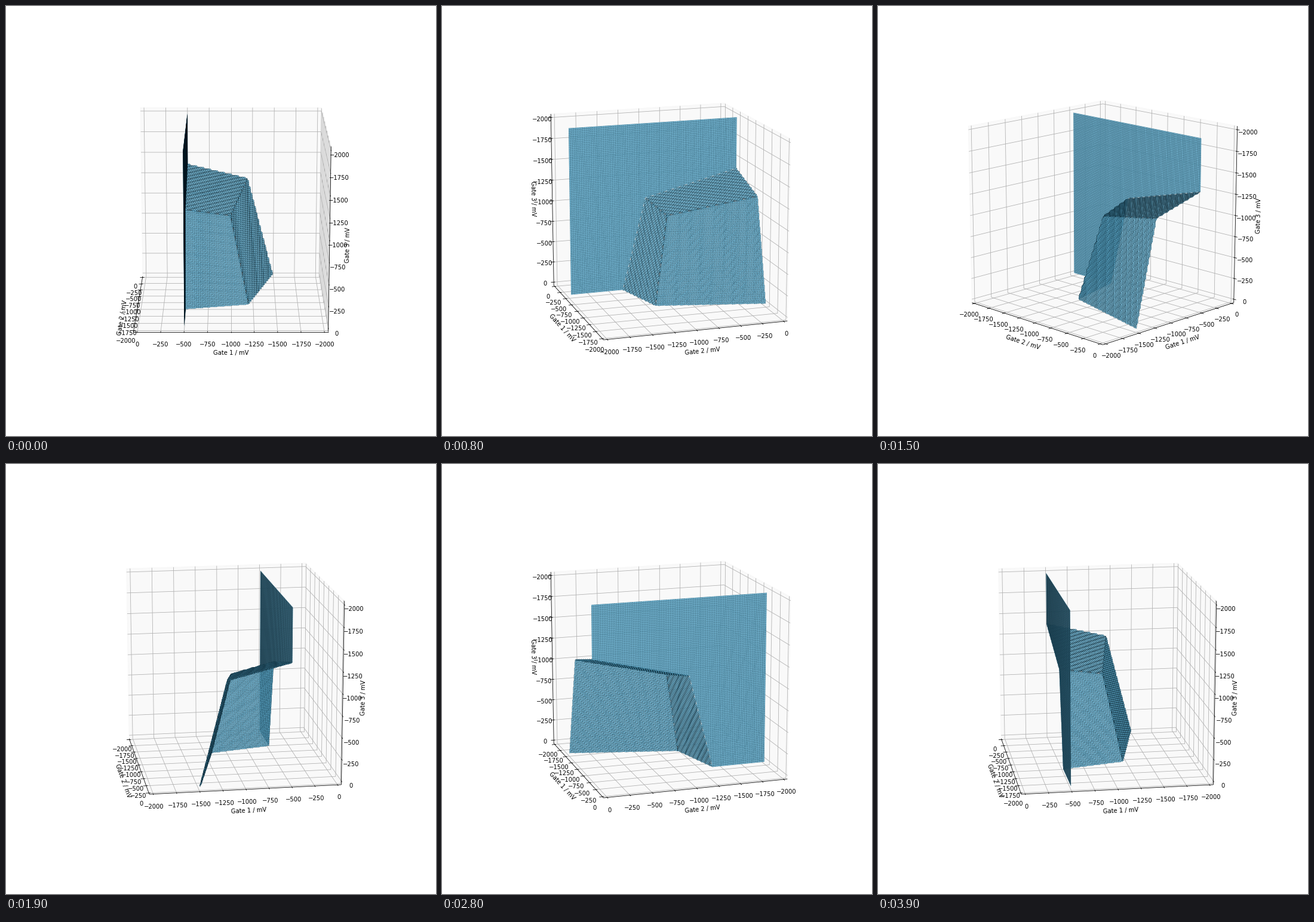
A matplotlib script that plays this animation: 720x720 px, repeating every 4000 ms.

```python
import numpy as np
import matplotlib.pyplot as plt
from matplotlib.animation import FuncAnimation
from matplotlib.collections import LineCollection, PolyCollection
from matplotlib.patches import Polygon

FRAMES = 40
CELLS = 100
LO, HI = -1 / 48, 1 + 1 / 48          # box edges just outside the data range
CE, SE = np.cos(np.radians(15)), np.sin(np.radians(15))
CENTRE = np.array([376.5, 350.9])
SCALE = np.array([3016.2, -2938.4])
DIST = 10

TICKS = np.linspace(0, 1, 9)
TICK_PAD, LABEL_PAD = 0.0418, 0.0908
FLIP = (1, 0, 0)                      # axis moved to the front for each box edge
NAMES = ("Gate 2 / mV", "Gate 1 / mV", "Gate 3 / mV")

LIMIT = 0.747                         # block faces: h + (p + q) / 4 = LIMIT
WALL = 0.25
FACE = (0.40, 0.72, 0.86, 0.85)
EDGE = "#00141e"


def project(points, az):
    """Perspective view of unit-cube points: pixel positions and depth."""
    x, y, z = np.moveaxis(np.asarray(points, float) - 0.5, -1, 0)
    c, s = np.cos(az), np.sin(az)
    near, side = x * c + y * s, y * c - x * s
    depth = DIST - near * CE - z * SE
    flat = np.stack([side / depth, (z * CE - near * SE) / depth], axis=-1)
    return CENTRE + SCALE * flat, depth


def stepped_face(h, p, q, p_start):
    """Terraced face with height along axis h over the axes p and q."""
    p_raw, q_raw = np.meshgrid(np.arange(p_start, 0.7, 1 / CELLS),
                               np.arange(0, 0.7, 1 / CELLS), indexing="ij")
    top = 4 * LIMIT
    p_in = np.minimum(p_raw, (top - q_raw) / 5)
    q_in = np.minimum(q_raw, (top - p_in) / 5)
    pts = np.empty(p_in.shape + (3,))
    pts[..., p], pts[..., q] = p_in, q_in
    pts[..., h] = (np.floor(CELLS * (LIMIT - (p_in + q_in) / 4)) + 0.5) / CELLS
    a, b, c, d = pts[:-1, :-1], pts[1:, :-1], pts[1:, 1:], pts[:-1, 1:]
    keep = (5 * p_raw + q_raw < top) & (p_raw + 5 * q_raw < top)
    # the repeated corners add the diagonal to each outline
    return np.stack([a, b, c, d, a, c], axis=2)[keep[:-1, :-1]]


def on_wall(vw):
    vw = np.asarray(vw, float)
    return np.insert(vw, 1, WALL, axis=-1)


def wall_outline():
    k = LIMIT - WALL / 4
    m = 1 - 1 / CELLS
    return on_wall([(0, m), (m, m), (m, 0), (k, 0), (k / 1.25, k / 1.25), (0, k)])


def wall_mesh():
    m = 1 - 1 / CELLS
    grid = np.arange(CELLS) / CELLS
    segs = [((t, 0), (t, m)) for t in grid]
    segs += [((0, t), (m, t)) for t in grid]
    segs += [((max(t, 0), max(-t, 0)), (min(m, m + t), min(m, m - t)))
             for t in np.concatenate([-grid[:0:-1], grid])]
    return on_wall(segs)


block = np.concatenate([stepped_face(1, 0, 2, 0),
                        stepped_face(2, 1, 0, WALL),
                        stepped_face(0, 1, 2, WALL)])
outline, mesh = wall_outline(), wall_mesh()

plt.rcParams["font.family"] = "DejaVu Sans"
fig = plt.figure(figsize=(10, 10), dpi=72, facecolor="white")
ax = fig.add_axes([0, 0, 1, 1])
ax.set_xlim(0, 720)
ax.set_ylim(720, 0)
ax.axis("off")

panes = PolyCollection([], facecolors="#f9f9f9", edgecolors="#f4f4f4",
                       linewidths=0.5, zorder=0)
grid_lines = LineCollection([], colors="#b0b0b0", linewidths=0.8, zorder=1)
axis_lines = LineCollection([], colors="black", linewidths=0.8, zorder=2)
block_faces = PolyCollection([], facecolors=[FACE], edgecolors=EDGE,
                             linewidths=0.14, zorder=4, snap=False)
wall_lines = LineCollection([], colors=EDGE, linewidths=0.2, snap=False)
for coll in (panes, grid_lines, axis_lines, block_faces, wall_lines):
    ax.add_collection(coll, autolim=False)
wall = ax.add_patch(Polygon([(0, 0), (1, 0), (1, 1)], closed=True,
                            facecolor=FACE, edgecolor="none"))
wall_lines.set_clip_path(wall)

tick_texts = [[ax.text(0, 0, f"{-2000 * t:.0f}".replace("-", "\u2212") if t else "0",
                       size=10, ha="center", va="top", zorder=2) for t in TICKS]
              for _ in range(3)]
name_texts = [ax.text(0, 0, name, size=10, ha="center", va="center",
                      rotation_mode="anchor", zorder=2) for name in NAMES]


def replaced(point, **axes):
    """Copy of a point with some coordinates changed, e.g. a1=0.5."""
    out = np.array(point, float)
    for key, value in axes.items():
        out[int(key[1])] = value
    return out


def draw_box(az):
    eye = np.array([np.cos(az), np.sin(az), 1])
    back = np.where(eye <= 0, HI, LO)
    pane_pts, grid_pts, line_pts = [], [], []
    for i in range(3):
        j, k = (i + 1) % 3, (i + 2) % 3
        pane_pts.append([replaced(back, **{f"a{j}": p, f"a{k}": q})
                         for p, q in ((LO, LO), (HI, LO), (HI, HI), (LO, HI))])

        f = FLIP[i]
        edge = replaced(back, **{f"a{f}": 1 - back[f]})
        far = replaced(edge, **{f"a{i}": 1 - edge[i]})
        line_pts.append([edge, far])
        out = np.sign(edge - 0.5)
        out[i] = 0

        for t, text in zip(TICKS, tick_texts[i]):
            base = replaced(back, **{f"a{i}": t})
            grid_pts.append([replaced(base, **{f"a{j}": 1 - back[j]}), base,
                             replaced(base, **{f"a{k}": 1 - back[k]})])
            spot = replaced(edge, **{f"a{i}": t})
            line_pts.append([replaced(spot, **{f"a{f}": edge[f] + out[f] * r / 12})
                             for r in (0.2, -0.1)])
            text.set_position(project(spot + out * TICK_PAD, az)[0])

        ends = project([edge, far], az)[0]
        dx, dy = ends[1] - ends[0]
        angle = np.degrees(np.arctan2(-dy, dx)) % 180
        name_texts[i].set_rotation(angle - 180 if angle > 90 else angle)
        middle = (edge + far) / 2 + out * LABEL_PAD
        name_texts[i].set_position(project(middle, az)[0])

    panes.set_verts(project(pane_pts, az)[0])
    grid_lines.set_segments(project(grid_pts, az)[0])
    axis_lines.set_segments(project(line_pts, az)[0])


def draw_surface(az):
    flat, depth = project(block, az)
    block_faces.set_verts(flat[np.argsort(-depth.mean(axis=1))])
    wall.set_xy(project(outline, az)[0])
    wall_lines.set_segments(project(mesh, az)[0])
    # the wall covers the block when seen from its far side
    behind = DIST * CE * np.sin(az) + 0.5 > WALL
    wall.set_zorder(3 if behind else 5)
    wall_lines.set_zorder(3.5 if behind else 5.5)


def draw(frame):
    az = 2 * np.pi * frame / FRAMES
    draw_box(az)
    draw_surface(az)
    return []


anim = FuncAnimation(fig, draw, frames=FRAMES, interval=100, repeat=True,
                     repeat_delay=0, blit=False)
plt.show()
```
